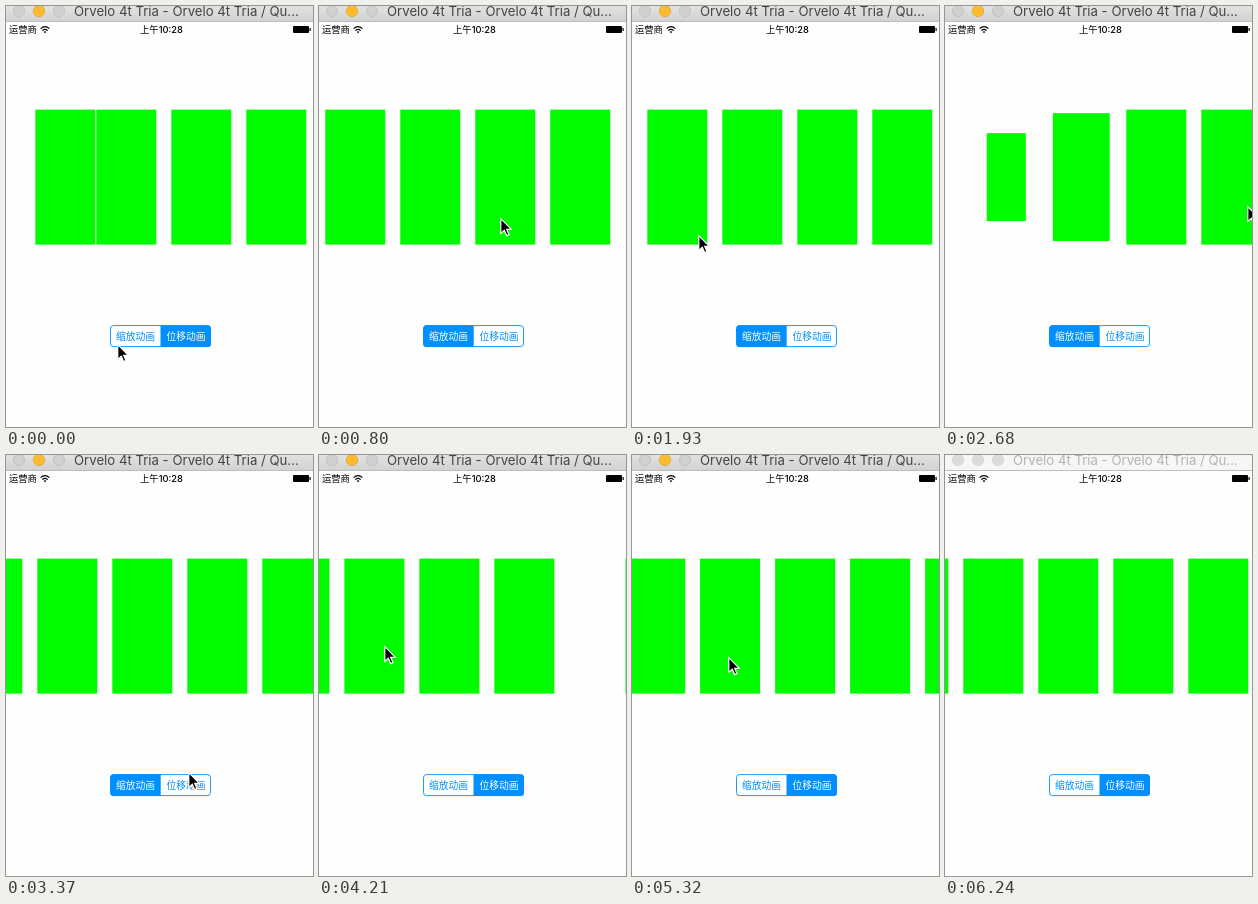
Animation, 307 px wide and 421 px high, one loop 6.29 s. Source, as an HTML page:

```html
<!DOCTYPE html>
<html lang="zh">
<head>
<meta charset="utf-8">
<style>
  html, body { margin: 0; width: 100%; height: 100%; overflow: hidden; background: #fefefe; }
  svg { display: block; width: 307px; height: 421px; }
  text { font-family: "Noto Sans CJK SC", "Noto Sans CJK", sans-serif; }
  .title { font: 13.2px Inter, "Liberation Sans", sans-serif; fill: #444; }
  .small { font-size: 9.3px; fill: #000; }
  .time { font: 500 9.3px Inter, "Noto Sans CJK SC", sans-serif; }
  .seg { font-size: 9.8px; font-weight: 300; text-anchor: middle; fill: #008fff; }
  .seg.on { fill: #fff; }
  .light { fill: #d0d0d0; stroke: #bcbcbc; stroke-width: .7; }
  .light.mid { fill: #fdbc2e; stroke: #e0a025; }
  .idle .title { fill: #b4b4b4; }
  .idle .light { fill: #dcdcdc; stroke: #d0d0d0; }
  .idle .bar { fill: #f6f6f6; }
</style>
</head>
<body>
<svg viewBox="0 0 307 421">
  <defs>
    <linearGradient id="chrome" x1="0" y1="0" x2="0" y2="1">
      <stop offset="0" stop-color="#e2e2e2"/>
      <stop offset="1" stop-color="#d2d2d2"/>
    </linearGradient>
  </defs>
  <rect width="307" height="421" fill="#fefefe"/>
  <g id="window">
    <rect class="bar" width="307" height="15" fill="url(#chrome)"/>
    <rect y="15" width="307" height="1" fill="#bdbdbd"/>
    <circle class="light" cx="13" cy="5" r="5.7"/>
    <circle class="light mid" cx="33" cy="5" r="5.7"/>
    <circle class="light" cx="53" cy="5" r="5.7"/>
    <text class="title" x="68" y="10">Orvelo 4t Tria - Orvelo 4t Tria / Qu...</text>
  </g>
  <text class="small" x="3" y="27.3">运营商</text>
  <g fill="none" stroke="#000" stroke-width="1.2">
    <path d="M34.6 22.6Q39 18.8 43.4 22.6M36.3 24.6Q39 22.3 41.7 24.6"/>
    <path d="M39 27.2L37.6 25.8Q39 24.8 40.4 25.8Z" fill="#000" stroke="none"/>
  </g>
  <text class="small time" x="155.5" y="27" text-anchor="middle">上午10:28</text>
  <rect x="287" y="20" width="16" height="7" rx="1" fill="#000"/>
  <rect x="303.5" y="22" width="1.2" height="3" fill="#000"/>
  <g id="cells" fill="#01fc00"></g>
  <rect x="104.5" y="319.6" width="100" height="21" rx="3" fill="#fff" stroke="#008fff" stroke-width=".9"/>
  <path id="chosen" d="M154.5 319.2H201.5Q205 319.2 205 322.7V337.5Q205 341 201.5 341H154.5Z" fill="#008fff"/>
  <text class="seg" x="129.5" y="333.6">缩放动画</text>
  <text class="seg" x="180" y="333.6">位移动画</text>
  <path id="cursor" d="M.8 .6V15.4L4.3 12.2L6.6 17.6L9 16.6L6.7 11.3H11.3Z" fill="#000" stroke="#fff" stroke-width="1.2"/>
</svg>
<script>
const LOOP = 6290, STEP = 57.18, LAST = 109;
const PITCH = 75, W = 60, H = 135, MID_Y = 171.1, VIEW = 307;
const SETTLE = 9;                     // steps a new cell takes to settle
const SCALE_ON = 3, SCALE_OFF = 60;   // steps at which the control is tapped
const IDLE = 105;

const START_X = -144.7;
const swipes = [
  { from: -14.1, steps: 14, dx: 160 },
  { from: 12, steps: 18, dx: -300 },
  { from: 34.75, steps: 12.3, dx: 241 },
  { from: 65.6, steps: 17.2, dx: -168 },
  { from: 82.2, steps: 17.4, dx: 80 },
];

// [step, x, y]
const pointer = [[0, 111, 338], [3, 112, 337], [10, 210, 212], [14, 181, 212], [22, 50, 270],
  [34, 66, 229], [46, 312, 190], [60, 172, 327], [66, 200, 200], [74, 65, 191],
  [83, 44, 215], [93, 96, 202], [97, 118, 212], [103, 190, 425]];

const $ = id => document.getElementById(id);
const ease = u => (1 - Math.cos(Math.PI * Math.min(1, Math.max(0, u)))) / 2;

const scrollX = n => swipes.reduce((x, s) => x + s.dx * ease((n - s.from) / s.steps), START_X);
const homeX = (i, n) => scrollX(n) + PITCH * i;
const scaleMode = n => n >= SCALE_ON && n < SCALE_OFF;

function visible(i, n) {
  const x = homeX(i, n);
  return x + W > 1 && x < VIEW;
}

// step at which the cell last came into view, as far back as it matters
function entered(i, n) {
  let m = n;
  while (n - m < SETTLE && visible(i, m)) m -= 0.05;
  return m;
}

// new cells either grow in place or slide in from the right
function cellBox(i, n) {
  const start = entered(i, n);
  const rest = 1 - ease((n - start) / SETTLE);
  const grows = scaleMode(start);
  const s = grows ? 1 - 0.9 * rest : 1;
  const shift = grows ? 0 : 100 * rest;
  return {
    x: homeX(i, n) + shift + W * (1 - s) / 2,
    y: MID_Y - H * s / 2,
    width: W * s,
    height: H * s,
  };
}

function pointerAt(n) {
  const k = pointer.findIndex(p => p[0] > n);
  if (k < 0) return pointer[pointer.length - 1].slice(1);
  const a = pointer[k - 1], b = pointer[k], u = (n - a[0]) / (b[0] - a[0]);
  return [1, 2].map(c => Math.round(a[c] + (b[c] - a[c]) * u));
}

const cells = Array.from({ length: 7 }, () =>
  $("cells").appendChild(document.createElementNS("http://www.w3.org/2000/svg", "rect")));
const labels = document.querySelectorAll(".seg");

function draw(n) {
  const first = Math.floor((-W - scrollX(n)) / PITCH);
  cells.forEach((rect, k) => {
    const i = first + k, shown = visible(i, n);
    rect.style.display = shown ? "" : "none";
    if (!shown) return;
    for (const [name, value] of Object.entries(cellBox(i, n))) rect.setAttribute(name, value);
  });

  const left = scaleMode(n);
  $("chosen").setAttribute("transform", left ? "matrix(-1 0 0 1 309.2 0)" : "");
  labels[0].classList.toggle("on", left);
  labels[1].classList.toggle("on", !left);

  $("cursor").setAttribute("transform", `translate(${pointerAt(n)})`);
  $("window").setAttribute("class", n >= IDLE ? "idle" : "");
}

let shownStep = -1;
const begin = performance.now();
function tick() {
  const t = (performance.now() - begin) % LOOP;
  const n = Math.min(LAST, Math.floor((t + 25) / STEP));
  if (n !== shownStep) draw(shownStep = n);
  requestAnimationFrame(tick);
}
tick();
</script>
</body>
</html>
```
